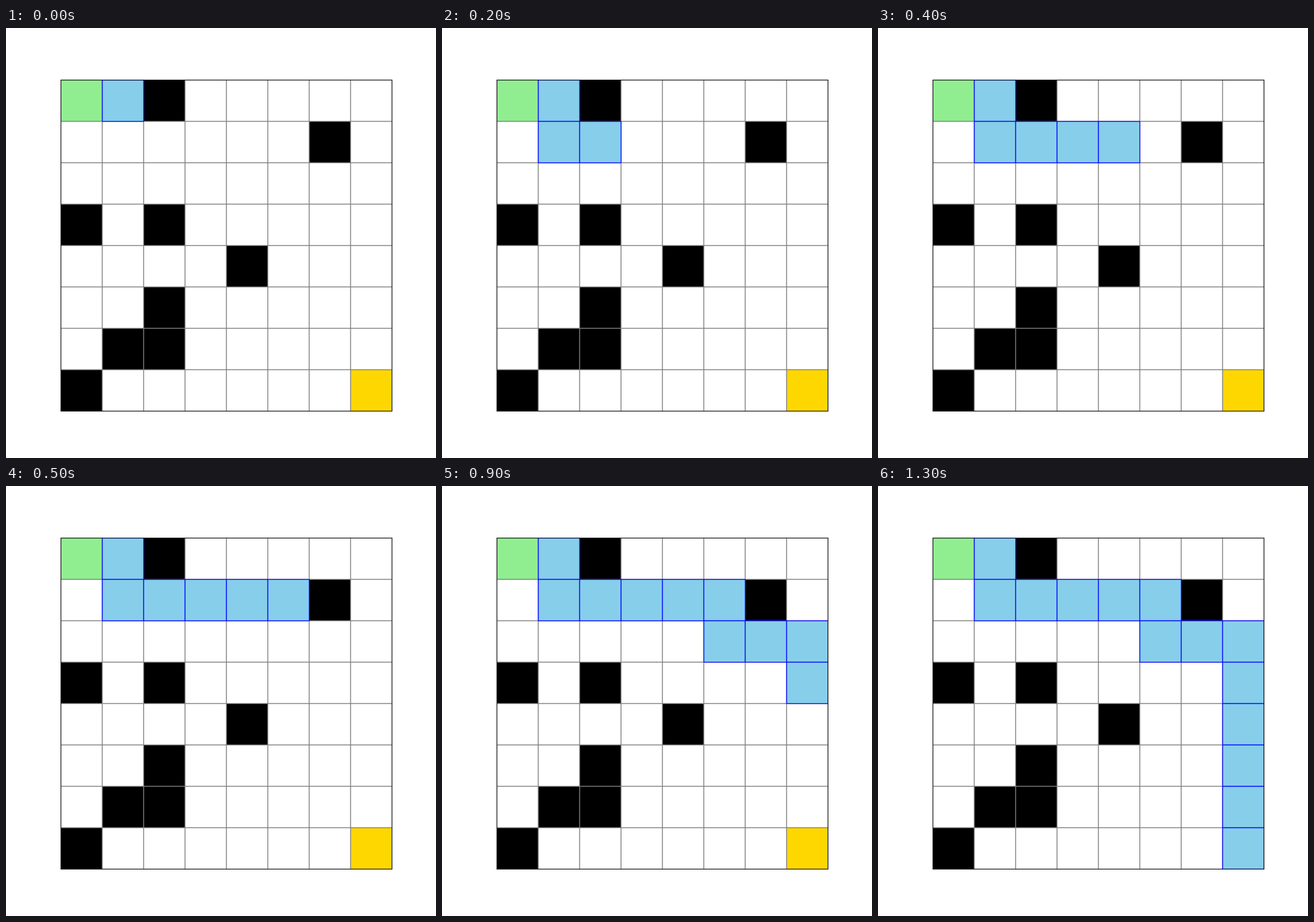
Animation of 748x748 px, one loop 1400 ms. Source, as a matplotlib script:

```python
import matplotlib.pyplot as plt
from matplotlib.animation import FuncAnimation
from matplotlib.patches import Rectangle

SIZE = 8
DPI = 100
START, GOAL = (0, 0), (7, 7)
WALLS = {(0, 2), (1, 6), (3, 0), (3, 2), (4, 4), (5, 2), (6, 1), (6, 2), (7, 0)}

# Cells in visiting order, as (row, column)
PATH = (
    [(0, 1)]
    + [(1, col) for col in range(1, 6)]
    + [(2, col) for col in range(5, 8)]
    + [(row, 7) for row in range(3, 8)]
)

fig, ax = plt.subplots(figsize=(748 / DPI, 748 / DPI), dpi=DPI)
ax.set(xlim=(0, SIZE), ylim=(SIZE, 0), xticks=[], yticks=[], aspect="equal")


def add_cell(row, col, face, edge):
    return ax.add_patch(
        Rectangle((col, row), 1, 1, facecolor=face, edgecolor=edge, linewidth=1)
    )


def cell_color(cell):
    if cell in WALLS:
        return "black"
    return {START: "lightgreen", GOAL: "gold"}.get(cell, "white")


for row in range(SIZE):
    for col in range(SIZE):
        add_cell(row, col, cell_color((row, col)), "gray")

steps = [add_cell(row, col, "skyblue", "blue") for row, col in PATH]


def update(frame):
    for i, step in enumerate(steps):
        step.set_visible(i <= frame)
    return steps


anim = FuncAnimation(
    fig, update, frames=len(PATH), interval=100, repeat=True, repeat_delay=0
)
plt.show()
```
